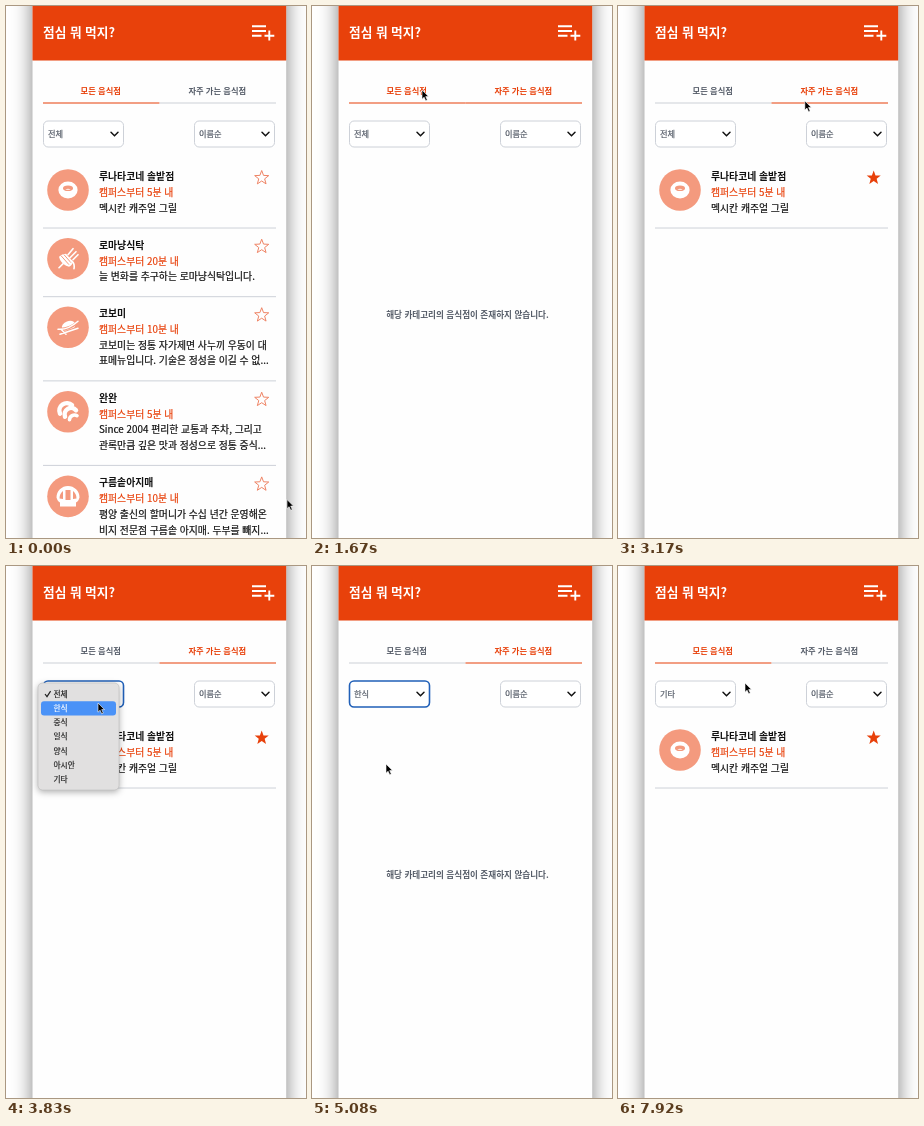
An HTML page for the animation above (8 s loop, 300 by 532 pixels).

```html
<!DOCTYPE html>
<html lang="ko">
<head>
<meta charset="utf-8">
<style>
  html, body { margin: 0; width: 100%; height: 100%; overflow: hidden; background: #fff; }
  svg { display: block; width: 300px; height: 532px; overflow: hidden; font-family: "Noto Sans CJK KR", "Noto Sans CJK", sans-serif; }
  .phone { filter: drop-shadow(0 0 10px rgba(0, 0, 0, .5)); }
  .popup { filter: drop-shadow(0 2px 3px rgba(0, 0, 0, .3)); }
</style>
</head>
<body>
<svg viewBox="0 0 300 532">
  <rect class="phone" x="26.5" y="-40" width="253.7" height="612" fill="#fefefe"/>
  <g id="screen"></g>
</svg>
<script>
const LOOP = 8000, FPS = 12;
const ORANGE = '#e8410b', PEACH = '#f49a7e', GRAY = '#565d69', LINE = '#cdd1d8';
const screenGroup = document.getElementById('screen');

const places = [
  { top: 153.3, name: '루나타코네 솔밭점', walk: 5, about: ['멕시칸 캐주얼 그릴'] },
  { top: 222, name: '로마냥식탁', walk: 20, about: ['늘 변화를 추구하는 로마냥식탁입니다.'] },
  { top: 290.5, name: '코보미', walk: 10, about: ['코보미는 정통 자가제면 사누끼 우동이 대', '표메뉴입니다. 기술은 정성을 이길 수 없...'] },
  { top: 375, name: '완완', walk: 5, about: ['Since 2004 편리한 교통과 주차, 그리고', '관록만큼 깊은 맛과 정성으로 정통 중식...'] },
  { top: 459.7, name: '구름솥아지매', walk: 10, about: ['평양 출신의 할머니가 수십 년간 운영해온', '비지 전문점 구름솥 아지매. 두부를 빼지...'] },
];
const categories = ['전체', '한식', '중식', '일식', '양식', '아시안', '기타'];

// Drawn around the centre of each badge
const icons = [
  `<ellipse rx="9.6" ry="8.4" fill="#fff"/><ellipse cy="-1.8" rx="5" ry="2.8" fill="${PEACH}"/>
   <path d="M-2.6 -.2q2.6 -2 5.2 0z" fill="#fff"/>`,
  `<path d="M-9 -2Q-6 -5 -2 -5L5 3Q4 7 1 8Q-7 6 -9 -2z" fill="#fff"/>
   <path d="M-7 -3l8 9M-4 -4l7 8" stroke="${PEACH}"/>
   <path d="M-9 9l4 -4M0 -4l5 -6M2 -1l6 -6M5 1l5 -5M3 2q4 2 3 8" fill="none" stroke="#fff" stroke-width="1.6" stroke-linecap="round"/>`,
  `<ellipse cx="1" cy="-1" rx="7" ry="4.8" transform="rotate(-20)" fill="#fff"/>
   <path d="M-9 2Q0 3 10 -5M-8 7L9 1" fill="none" stroke="${PEACH}" stroke-width="3"/>
   <path d="M-10 2Q0 3 10 -6M-8 7L10 1M-7 2l5 5" fill="none" stroke="#fff" stroke-width="1.5" stroke-linecap="round"/>`,
  `<g fill="none" stroke="#fff" stroke-linecap="round"><path d="M-8 2A7.5 7.5 0 0 1 4 -6.5" stroke-width="4.5"/>
   <path d="M-3 5A6.5 6.5 0 0 1 8 -1.5" stroke-width="4.5"/><path d="M1.5 8A5 5 0 0 1 9 4" stroke-width="3.6"/></g>`,
  `<path d="M-11.5 1a11.5 11.5 0 0 1 23 0q-1 4 -3.5 5v4h-16v-4q-2.5 -1 -3.5 -5z" fill="#fff"/>
   <path d="M-8.5 2q0 -5 3.5 -7.5v8zM8.5 2q0 -5 -3.5 -7.5v8zM-2.5 3.5v-10h5v10z" fill="${PEACH}"/>`,
];

// Pointer stops: time, x, y
const stops = [
  [0, 281, 493.5], [250, 281, 493.5], [840, 205, 81], [1250, 205, 81], [1670, 110, 84],
  [1830, 110, 84], [2380, 257, 171], [2670, 257, 171], [2960, 212, 86], [3060, 212, 86],
  [3420, 93, 128], [3750, 92, 129], [3830, 92, 137], [4050, 92, 138], [4400, 80, 126],
  [4950, 74, 198], [5250, 74, 198], [6150, 113, 87], [6330, 113, 87], [6750, 130, 126],
  [7080, 126, 118], [7830, 126, 118], [7900, 127, 117], [LOOP, 127, 117],
];

function pointerAt(t) {
  const i = stops.findIndex((s, k) => k && t <= s[0]);
  const [t0, x0, y0] = stops[i - 1], [t1, x1, y1] = stops[i];
  const p = (t - t0) / (t1 - t0), e = p * p * (3 - 2 * p);
  return [x0 + (x1 - x0) * e, y0 + (y1 - y0) * e];
}

const between = (v, a, b) => v >= a && v < b;

// Placed by vertical centre; a hairline stroke gives regular text a medium weight
const text = (s, x, y, size, fill, weight = 400, anchor = 'start') =>
  `<text x="${x}" y="${y + size * .37}" font-size="${size}" fill="${fill}" stroke="${fill}" stroke-width="${weight === 400 ? .2 : 0}" font-weight="${weight}" text-anchor="${anchor}">${s}</text>`;

const hline = (x0, x1, y, color, width = 1) =>
  `<path d="M${x0} ${y}H${x1}" stroke="${color}" stroke-width="${width}"/>`;

function star(x, y, filled) {
  const pts = Array.from({ length: 10 }, (_, i) => {
    const a = i * Math.PI / 5, r = i % 2 ? 3.1 : 7.4;
    return `${x + r * Math.sin(a)},${y - r * Math.cos(a)}`;
  });
  return `<polygon points="${pts.join(' ')}" fill="${filled ? ORANGE : 'none'}" stroke="${filled ? 'none' : '#ef8465'}" stroke-linejoin="round"/>`;
}

const header = `<path d="M26.5 0h253.7v54.6h-253.7z" fill="${ORANGE}"/>` + text('점심 뭐 먹지?', 37, 26.5, 12.7, '#fff', 600) +
  '<path d="M246 20.2h14M246 25h14M246 29.7h9.5M263.3 24.6v10M258.5 29.7h9.8" stroke="#fff" stroke-width="1.9"/>';

function tab(label, x0, x1, on) {
  return text(label, (x0 + x1) / 2 - .5, 85, 8.25, on ? ORANGE : GRAY, 600, 'middle') +
    hline(x0, x1, 97, on ? ORANGE : LINE, 1.2);
}

function select(x, label, focused) {
  return `<rect x="${x + .5}" y="115" width="80" height="26" rx="4.5" fill="#fff" stroke="${focused ? '#2160b8' : LINE}" stroke-width="${focused ? 1.6 : 1}"/>` +
    text(label, x + 5, 128, 8.2, GRAY) +
    `<path d="M${x + 68} 126.2l3.5 3.5l3.5 -3.5" fill="none" stroke="#111" stroke-width="1.5" stroke-linecap="round"/>`;
}

function place({ top, name, walk, about }, i, starred) {
  return `<g transform="translate(62 ${top + 30.7})"><circle r="20.8" fill="${PEACH}"/>${icons[i]}</g>` +
    text(name, 93, top + 17, 9.85, '#111', 600) +
    text(`캠퍼스부터 ${walk}분 내`, 93, top + 33, 9.85, ORANGE) +
    about.map((s, k) => text(s, 93, top + 48.7 + k * 15.6, 9.85, '#111')).join('') +
    star(255.7, top + 18.6, starred) +
    hline(37, 270, top + 53 + about.length * 15.7, LINE);
}

function popup(chosen, pointerY) {
  const row = 14.2, top = 117 - chosen * row;
  const hover = Math.floor((pointerY - top - 4) / row);
  const rows = categories.map((s, i) => {
    const y = top + 11 + i * row, on = i === hover, ink = on ? '#fff' : '#222';
    return (on ? `<rect x="35" y="${y - 7}" width="75" height="14.2" rx="3" fill="#4a92f7"/>` : '') +
      (i === chosen ? `<path d="M39 ${y}l2 2.6l3.6 -5.4" fill="none" stroke="${ink}" stroke-width="1.2"/>` : '') +
      text(s, 47.5, y, 7.7, ink);
  });
  return `<rect class="popup" x="32" y="${top}" width="81" height="107" rx="4.5" fill="#e1e0e0" stroke="#bdbdbd" stroke-width=".6"/>` + rows.join('');
}

function scene(t) {
  const [px, py] = pointerAt(t);
  const favorites = between(t, 840, 1830) || between(t, 3000, 6300);
  const starred = t >= 2410;
  const chosen = t < 4050 ? 0 : t < 5130 ? 1 : 6;
  const open = between(t, 3490, 4050) || between(t, 4430, 5040);
  const focused = between(t, 3490, 6120);
  const overTab = between(py, 74, 98) ? (px < 153 ? 0 : 1) : -1;

  const shown = places.filter((_, i) =>
    chosen === 1 ? false : i === 0 ? !favorites || starred : !favorites && chosen === 0);
  return header +
    tab('모든 음식점', 37, 153.5, !favorites || overTab === 0) +
    tab('자주 가는 음식점', 153.5, 270, favorites || overTab === 1) +
    select(37, categories[chosen], focused) + select(188, '이름순', false) +
    shown.map((p, i) => place(p, i, i === 0 && starred)).join('') +
    (shown.length ? '' : text('해당 카테고리의 음식점이 존재하지 않습니다.', 155.5, 308.5, 8.6, GRAY, 600, 'middle')) +
    (open ? popup(chosen, py) : '') +
    `<path transform="translate(${px} ${py})" d="M0 0v9.2l2.1 -2l1.6 3.6l1.6 -.7l-1.6 -3.5h2.8z" fill="#000" stroke="#fff" stroke-width=".6"/>`;
}

let last = -1;
function draw(now) {
  const step = Math.floor((now % LOOP + 8) * FPS / 1000) % (LOOP * FPS / 1000);
  if (step !== last) screenGroup.innerHTML = scene(step * 1000 / FPS);
  last = step;
  requestAnimationFrame(draw);
}
draw(0);
</script>
</body>
</html>
```
